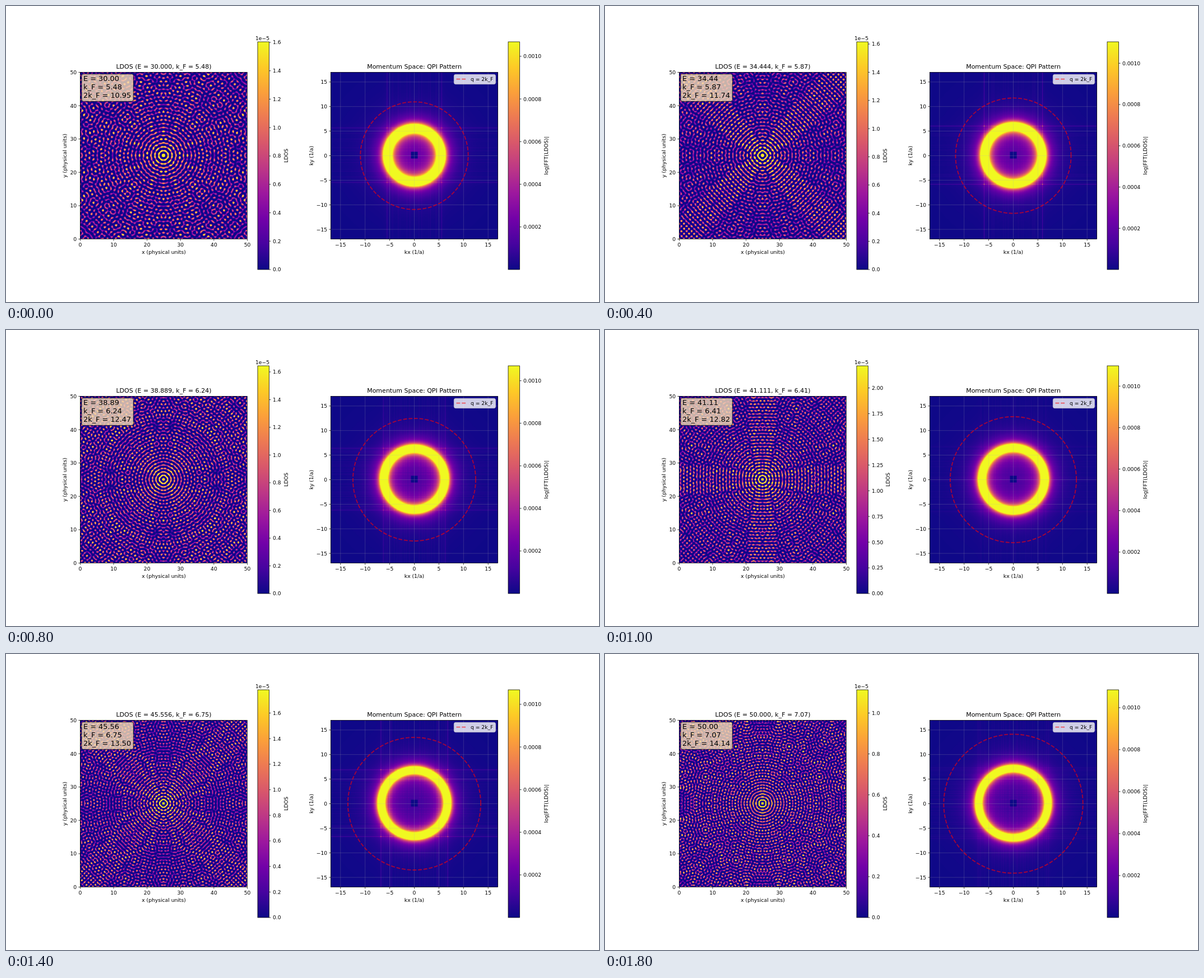
Write an HTML page with a canvas that moves like this. It is 1058 by 529 pixels and loops after 2 s.

```html
<!DOCTYPE html>
<html lang="en">
<head>
<meta charset="utf-8">
<style>
html, body { margin: 0; height: 100%; overflow: hidden; background: #fff; }
canvas { display: block; }
</style>
</head>
<body>
<canvas id="stage" width="1058" height="529"></canvas>
<script>
const ctx = document.getElementById('stage').getContext('2d');
const STEPS = 10, STEP_MS = 200;
const MODES = 136, HALF = 149, SIZE = 2 * HALF, BINS = 2 * MODES - 1;
const DK = 2 * Math.PI / 50;          // momentum of one bin
const DE = (2 * Math.PI / 50.07) ** 2; // energy of one mode step
const WAVE_ETA = 0.1, LINE_ETA = 0.05; // level broadening
const K_MAX = 1.2 * 2 * Math.sqrt(50);
const PX = 298 / (2 * K_MAX);

// colour bar tops, in units of 1e-5 and 1e-6
const ldosTop = [1.604, 2.1, 1.616, 1.7, 1.644, 2.215, 2.1, 1.782, 2.437, 1.1135];
const fftTop = [1068, 1080, 1104, 1085, 1070, 1098, 1080, 1068, 1038, 1085];

const PLASMA = ['0d0887', '46039f', '7201a8', '9c179e', 'bd3786',
  'd8576b', 'ed7953', 'fb9f3a', 'fdca26', 'f0f921'];
const stops = PLASMA.map(h => [0, 2, 4].map(i => parseInt(h.substr(i, 2), 16)));
const lut = Array.from({ length: 256 }, (_, i) => {
  const s = i / 255 * 9, a = Math.min(8, Math.floor(s));
  return stops[a].map((v, c) => v + (stops[a + 1][c] - v) * (s - a));
});

const cosTable = Array.from({ length: MODES }, (_, m) =>
  Float64Array.from({ length: HALF }, (_, d) => Math.cos(DK * m * (d + 0.5) / 5.96)));
const weight = m => m ? 2 : 1;

function bitmap(size, value) {
  const cv = document.createElement('canvas');
  cv.width = cv.height = size;
  const g = cv.getContext('2d'), img = g.createImageData(size, size);
  for (let y = 0, o = 0; y < size; y++) for (let x = 0; x < size; x++, o += 4) {
    const v = Math.max(0, Math.min(1, value(x, y)));
    img.data.set(lut[Math.round(v * 255)], o);
    img.data[o + 3] = 255;
  }
  g.putImageData(img, 0, 0);
  return cv;
}

// standing wave around a scatterer in the middle of the square
function waveMap(E) {
  const field = Array.from({ length: HALF }, () => new Float64Array(HALF));
  const row = new Float64Array(HALF);
  for (let p = 0; p < MODES; p++) {
    row.fill(0);
    for (let m = 0; m < MODES; m++) {
      const d = E - DE * (p * p + m * m), c = cosTable[m];
      const w = weight(p) * weight(m) * (d + 1.5 * WAVE_ETA) / (d * d + WAVE_ETA ** 2);
      for (let i = 0; i < HALF; i++) row[i] += w * c[i];
    }
    for (let j = 0; j < HALF; j++) {
      const c = cosTable[p][j], f = field[j];
      for (let i = 0; i < HALF; i++) f[i] += c * row[i];
    }
  }
  const sorted = Float64Array.from(field.flatMap(f => [...f])).sort();
  const top = sorted[Math.floor(sorted.length * 0.995)];
  const fold = i => i < HALF ? HALF - 1 - i : i - HALF;
  return bitmap(SIZE, (x, y) => field[fold(y)][fold(x)] / top);
}

// ring at k_F with the streaks of near-resonant modes and their crossings
function momentumMap(E) {
  const gap = (p, m) => E - DE * (p * p + m * m);
  const streak = Array.from({ length: MODES }, (_, p) => {
    let s = 0;
    for (let m = 0; m < MODES; m++) {
      const d = gap(p, m);
      s += weight(m) * d / (d * d + LINE_ETA ** 2);
    }
    return Math.min(1, (s / 45) ** 2);
  });
  return bitmap(BINS, (x, y) => {
    const p = Math.abs(x - MODES + 1), m = Math.abs(y - MODES + 1);
    if (p < 6 && m < 6) return 0;
    const ring = (10 / Math.abs(gap(p, m))) ** 1.5;
    return ring + 0.12 * (streak[p] + streak[m]) + 0.8 * streak[p] * streak[m];
  });
}

const states = Array.from({ length: STEPS }, (_, i) => {
  const E = 30 + 20 * i / 9;
  return { E, k: Math.sqrt(E), wave: waveMap(E), ring: momentumMap(E),
    ldos: ldosTop[i], fft: fftTop[i] };
});

function text(s, x, y, size = 9.18, align = 'center') {
  ctx.font = size + 'px "DejaVu Sans", sans-serif';
  ctx.textAlign = align;
  ctx.fillStyle = '#000';
  ctx.fillText(s, x, y);
}

function upright(s, x, y) {
  ctx.save();
  ctx.translate(x, y);
  ctx.rotate(-Math.PI / 2);
  text(s, 0, 0);
  ctx.restore();
}

function line(x1, y1, x2, y2, color = '#000', width = 0.75) {
  ctx.strokeStyle = color;
  ctx.lineWidth = width;
  ctx.beginPath();
  ctx.moveTo(x1, y1);
  ctx.lineTo(x2, y2);
  ctx.stroke();
}

function frame(x, y, w, h) {
  ctx.strokeStyle = '#000';
  ctx.lineWidth = 0.75;
  ctx.strokeRect(x, y, w, h);
}

function card(x, y, w, h, fill, stroke) {
  ctx.beginPath();
  ctx.roundRect(x, y, w, h, 3);
  ctx.fillStyle = fill;
  ctx.fill();
  ctx.strokeStyle = stroke;
  ctx.lineWidth = 0.9;
  ctx.stroke();
}

const label = v => String(v).replace('-', '\u2212');

function xTick(x, v) {
  line(x, 416.5, x, 419.7);
  text(label(v), x, 430);
}

function yTick(x, y, v) {
  line(x - 3.2, y, x, y);
  text(label(v), x - 6.4, y + 3.4, 9.18, 'right');
}

function colorBar(x, top, step, digits, from) {
  const g = ctx.createLinearGradient(0, 471, 0, 64);
  PLASMA.forEach((c, i) => g.addColorStop(i / 9, '#' + c));
  ctx.fillStyle = g;
  ctx.fillRect(x, 64, 20.4, 407);
  frame(x, 64, 20.4, 407);
  for (let i = from; i * step <= top; i++) {
    const y = 471 - 407 * i * step / top;
    line(x + 20.4, y, x + 23.6, y);
    text((i * step).toFixed(digits), x + 27, y + 3.4, 9.18, 'left');
  }
}

function drawWave(s) {
  ctx.drawImage(s.wave, 132, 118, 298, 298);
  frame(132.5, 118.5, 298, 298);
  for (let v = 0; v <= 50; v += 10) {
    xTick(132.5 + v * 5.96, v);
    yTick(132.5, 416.5 - v * 5.96, v);
  }
  text(`LDOS (E = ${s.E.toFixed(3)}, k_F = ${s.k.toFixed(2)})`, 281.5, 112, 11.02);
  text('x (physical units)', 281.5, 443);
  upright('y (physical units)', 107.5, 267.5);
  card(135, 121.6, 92.3, 48.8, 'rgba(245,222,179,0.8)', 'rgba(0,0,0,0.8)');
  [`E = ${s.E.toFixed(2)}`, `k_F = ${s.k.toFixed(2)}`, `2k_F = ${(2 * s.k).toFixed(2)}`]
    .forEach((t, i) => text(t, 138, 134.4 + i * 14.9, 12.86, 'left'));

  const step = s.ldos < 2 ? 0.2 : s.ldos < 2.3 ? 0.25 : 0.5;
  const digits = step === 0.25 ? 2 : 1;
  colorBar(449, s.ldos, step, digits, 0);
  text('1e\u22125', 445, 61, 9.18, 'left');
  upright('LDOS', digits === 2 ? 508 : 502.5, 267.5);
}

function drawMomentum(s) {
  const cx = 728.5, cy = 267.5, span = BINS * DK * PX;
  ctx.save();
  ctx.beginPath();
  ctx.rect(579.5, 118.5, 298, 298);
  ctx.clip();
  ctx.fillStyle = '#' + PLASMA[0];
  ctx.fillRect(579, 118, 299, 299);
  ctx.drawImage(s.ring, cx - span / 2, cy - 1 - span / 2, span, span);
  for (let v = -15; v <= 15; v += 5) {
    line(cx + v * PX, 118, cx + v * PX, 417, 'rgba(176,176,176,0.3)');
    line(579, cy - v * PX, 878, cy - v * PX, 'rgba(176,176,176,0.3)');
  }
  ctx.setLineDash([6.8, 2.94]);
  ctx.strokeStyle = 'rgba(255,0,0,0.6)';
  ctx.lineWidth = 1.84;
  ctx.beginPath();
  ctx.arc(cx, cy, 2 * s.k * PX, 0, 2 * Math.PI, true);
  ctx.stroke();
  ctx.restore();
  frame(579.5, 118.5, 298, 298);
  for (let v = -15; v <= 15; v += 5) {
    xTick(cx + v * PX, v);
    yTick(579.5, cy - v * PX, v);
  }
  text('Momentum Space: QPI Pattern', cx, 112, 11.02);
  text('kx (1/a)', cx, 443);
  upright('ky (1/a)', 547.5, cy);

  card(799.3, 122.3, 74.2, 17.4, 'rgba(255,255,255,0.8)', 'rgba(204,204,204,0.8)');
  ctx.setLineDash([6.8, 2.94]);
  line(803.5, 130.6, 822, 130.6, 'rgba(255,0,0,0.6)', 1.84);
  ctx.setLineDash([]);
  text('q = 2k_F', 829, 133.8, 9.18, 'left');

  colorBar(896, s.fft / 1e6, 0.0002, 4, 1);
  upright('log|FFT(LDOS)|', 966.5, 267.5);
}

const start = performance.now();
let shown = -1;
function tick(now) {
  const i = Math.floor(Math.max(0, now - start) / STEP_MS) % STEPS;
  if (i !== shown) {
    shown = i;
    ctx.fillStyle = '#fff';
    ctx.fillRect(0, 0, 1058, 529);
    drawWave(states[i]);
    drawMomentum(states[i]);
  }
  requestAnimationFrame(tick);
}
tick(start);
</script>
</body>
</html>
```
